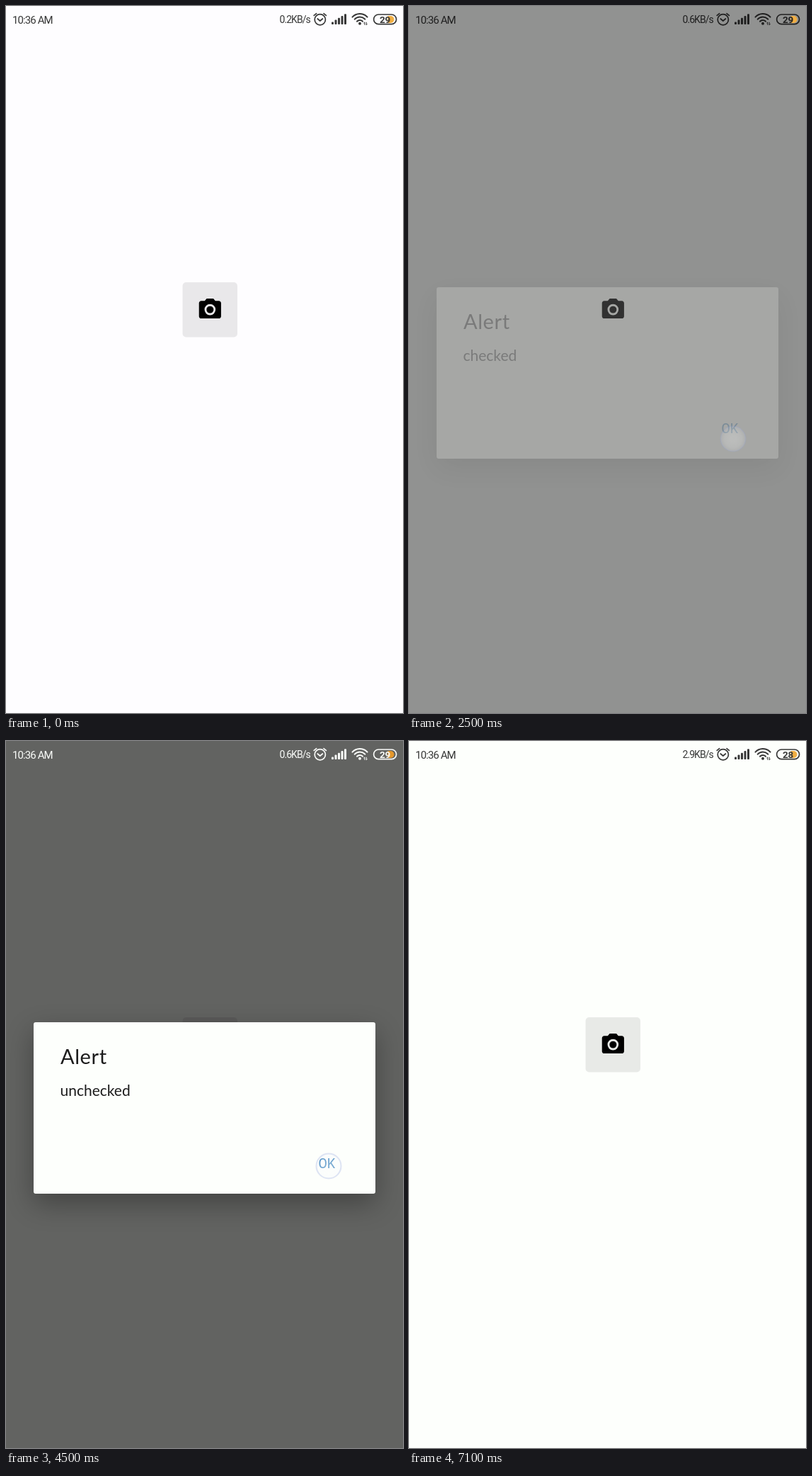
Animation, 561 px wide and 998 px high, one loop 7400 ms. Source, as an HTML page with a canvas:

```html
<!DOCTYPE html>
<html lang="en">
<head>
<meta charset="utf-8">
<title>Camera toggle</title>
<style>
html, body { margin: 0; width: 100%; height: 100%; overflow: hidden; background: #fdfffc; }
canvas { display: block; }
</style>
</head>
<body>
<canvas id="stage" width="561" height="998"></canvas>
<script>
const W = 561, H = 998, LOOP = 7400, STEP = 100, DIM = 0.61;
const ctx = document.getElementById('stage').getContext('2d');
const layer = document.createElement('canvas');
layer.width = W;
layer.height = H;
const dialogCtx = layer.getContext('2d');

const alerts = [
  { message: 'checked', open: 1140, close: 2410 },
  { message: 'unchecked', open: 3570, close: 4765 }
];
const touches = [
  { x: 301, y: 449, from: 900, to: 1300 },
  { x: 458, y: 611, from: 2300, to: 2560 },
  { x: 301, y: 447, from: 3400, to: 3700 },
  { x: 456, y: 600, from: 4500, to: 4960 }
];
const camera = new Path2D(
  'M9 2L7.17 4H4c-1.1 0-2 .9-2 2v12c0 1.1.9 2 2 2h16c1.1 0 2-.9 2-2V6c0-1.1-.9-2-2-2h-3.17L15 2z' +
  'M12 17a5 5 0 0 1 0-10a5 5 0 0 1 0 10z' +
  'M12 8.8a3.2 3.2 0 0 1 0 6.4a3.2 3.2 0 0 1 0-6.4z');

const clamp = v => Math.max(0, Math.min(1, v));
const within = (t, a, b) => t >= a && t < b;

function box(c, x, y, w, h, r, color) {
  c.fillStyle = color;
  c.beginPath();
  c.roundRect(x, y, w, h, r);
  c.fill();
}

function label(c, text, x, y, font, color, spacing = 0) {
  c.font = font;
  c.letterSpacing = spacing + 'px';
  c.fillStyle = color;
  c.fillText(text, x, y);
}

function line(points) {
  ctx.beginPath();
  points.forEach(([x, y]) => ctx.lineTo(x, y));
  ctx.stroke();
}

function arc(x, y, r, a = 0, b = Math.PI * 2) {
  ctx.beginPath();
  ctx.arc(x, y, r, a, b);
}

// Opacity of the dialog and its backdrop for one alert
function alertState(t, { open, close }) {
  if (t < open) return { dim: 0, alpha: 0 };
  if (t < close) {
    const age = t - open;
    return { dim: DIM * clamp(age / 225), alpha: 1 - (1 - clamp(age / 150)) ** 2 };
  }
  const age = t - close;
  return { dim: DIM * (1 - clamp(age / 300)), alpha: (1 - clamp(age / 160)) ** 2 };
}

function drawButton(t) {
  const pressed = within(t, 1200, 1500) || within(t, 3600, 3900);
  const checked = within(t, 2400, 3600);
  if (pressed) box(ctx, 249.5, 390, 77.5, 77.5, 0, 'rgba(0,0,0,.32)');
  else if (!checked) box(ctx, 249.5, 390, 77.5, 77.5, 5, 'rgba(0,0,0,.082)');
  ctx.save();
  ctx.translate(269.6, 409.9);
  ctx.scale(1.56, 1.56);
  ctx.fillStyle = '#000';
  ctx.fill(camera, 'evenodd');
  ctx.restore();
}

function drawDialog(message, alpha) {
  const c = dialogCtx;
  c.clearRect(0, 0, W, H);
  c.save();
  c.shadowColor = 'rgba(0,0,0,.32)';
  c.shadowBlur = 38;
  c.shadowOffsetY = 14;
  box(c, 39, 397, 483, 242, 3, '#fdfffc');
  c.restore();
  label(c, 'Alert', 77, 455.5, '29px Lato, sans-serif', '#1c1c1c', 0.6);
  label(c, message, 76.5, 501, '21px Lato, sans-serif', '#1c1c1c');
  label(c, 'OK', 441.5, 602.5, '20.5px "Noto Sans Mono", monospace', '#1c70b4');
  ctx.globalAlpha = alpha;
  ctx.drawImage(layer, 0, 0);
  ctx.globalAlpha = 1;
}

function drawTouch(t, { x, y, from, to }) {
  if (!within(t, from, to)) return;
  ctx.globalAlpha = clamp((t - from + 50) / 100) * clamp((to - t) / 200);
  const glow = ctx.createRadialGradient(x, y, 4, x, y, 18);
  glow.addColorStop(0, 'rgba(250,252,252,.85)');
  glow.addColorStop(0.6, 'rgba(248,250,252,.7)');
  glow.addColorStop(1, 'rgba(240,244,252,.35)');
  ctx.fillStyle = glow;
  arc(x, y, 17.5);
  ctx.fill();
  ctx.strokeStyle = 'rgba(150,165,220,.6)';
  ctx.lineWidth = 2;
  ctx.stroke();
  ctx.globalAlpha = 1;
}

function drawStatus(t, dim) {
  const light = within(t, 1500, 2400) || within(t, 4000, 4700);
  const shade = Math.round(56 * (1 - dim));
  const ink = light ? '#fafcf9' : `rgb(${shade},${shade},${shade})`;
  const speed = t < 700 ? '0.2' : t < 4700 ? '0.6' : '2.9';
  const font = '15px Roboto, sans-serif';
  label(ctx, '10:36 AM', 9, 24.5, font, ink, -0.9);
  label(ctx, speed + 'KB/s', 386.5, 24, '14px Roboto, sans-serif', ink, -0.95);

  ctx.strokeStyle = ctx.fillStyle = ink;
  ctx.lineCap = ctx.lineJoin = 'round';
  ctx.lineWidth = 1.7;

  // Alarm clock
  arc(443.8, 19.2, 7.6);
  ctx.stroke();
  line([[440.2, 18], [443.8, 21], [447.4, 18]]);
  line([[435.2, 13.4], [438.6, 10.6]]);
  line([[452.4, 13.4], [449, 10.6]]);

  // Signal strength
  for (let i = 0; i < 5; i++) {
    const h = 3.6 + i * 2.8;
    ctx.beginPath();
    ctx.roundRect(460 + i * 4.5, 26 - h, 3, h, 1);
    ctx.fill();
  }

  // Wireless
  ctx.lineWidth = 2;
  for (const r of [5.5, 10, 14.5]) {
    arc(500, 25.5, r, -Math.PI * 0.76, -Math.PI * 0.24);
    ctx.stroke();
  }
  arc(500, 24.8, 2);
  ctx.fill();
  ctx.lineWidth = 1;
  line([[506.8, 26.5], [506.8, 22.8], [505.8, 24]]);
  line([[509.2, 23], [509.2, 26.8], [510.2, 25.6]]);

  // Battery
  box(ctx, 539.5, 14, 9, 10, [0, 5, 5, 0], light ? '#e5982c' : '#f1ae42');
  ctx.lineWidth = 1.7;
  ctx.beginPath();
  ctx.roundRect(519.6, 12, 32, 13.6, 6.8);
  ctx.stroke();
  label(ctx, t < 5900 ? '29' : '28', 528, 23.6, 'bold 13.5px Roboto, sans-serif', ink, -0.2);
}

function draw(t) {
  ctx.fillStyle = t < 700 ? '#fefdff' : '#fdfffc';
  ctx.fillRect(0, 0, W, H);
  drawButton(t);
  const alert = alerts[t < 3000 ? 0 : 1];
  const { dim, alpha } = alertState(t, alert);
  ctx.fillStyle = `rgba(0,0,0,${dim})`;
  ctx.fillRect(0, 0, W, H);
  if (alpha > 0) drawDialog(alert.message, alpha);
  drawStatus(t, dim);
  touches.forEach(touch => drawTouch(t, touch));
}

const start = performance.now();
function tick() {
  const t = Math.max(0, performance.now() - start) % LOOP;
  draw(Math.floor(t / STEP) * STEP);
  requestAnimationFrame(tick);
}
tick();
</script>
</body>
</html>
```
